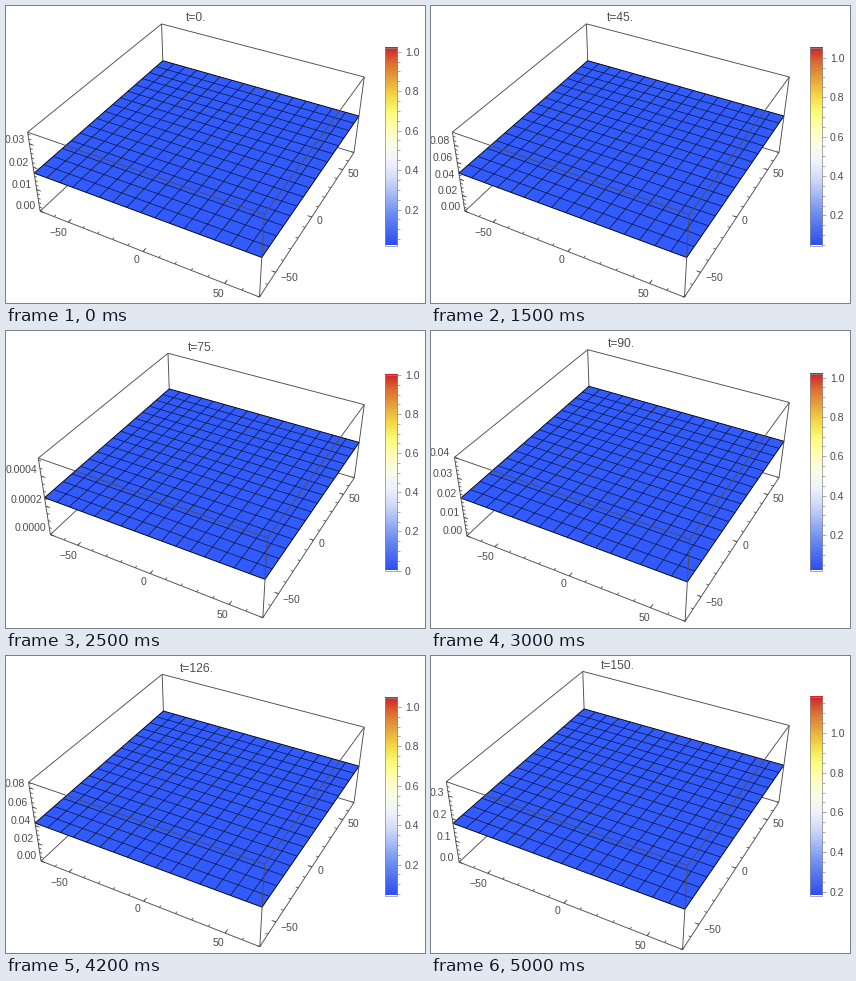
Recreate the animation shown at these times as a matplotlib script. Size 419 by 297 pixels, loop 5.1 s.

```python
import math

import numpy as np
import matplotlib.pyplot as plt
from matplotlib.animation import FuncAnimation
from matplotlib.collections import LineCollection
from matplotlib.colors import LinearSegmentedColormap

W, H, DPI = 419, 297, 100
FRAMES, INTERVAL = 51, 100
PX = 72 / DPI                     # points per pixel
FONT = 10.5                       # label size in pixels
DIGIT, DOT = 0.556 * FONT, 0.278 * FONT
EXTENT = 70                       # x and y run over +-EXTENT
BOX = np.array([0.5, 0.5, 0.2])   # half sizes of the plot box
MID_Y, RIGHT_X = 154.5, 358.3
BAR_X, BAR_END = (379, 391), 239.5

EDGE, INK, BLUE = "#4c4c4c", "#4d4d4d", "#325bff"

TEMPERATURE = LinearSegmentedColormap.from_list("temperature", [
    (0.18, 0.31, 0.93), (0.31, 0.44, 0.94), (0.45, 0.57, 0.95),
    (0.64, 0.72, 0.96), (0.82, 0.86, 0.98), (0.94, 0.95, 0.99),
    (0.98, 0.99, 0.91), (1.00, 0.99, 0.73), (0.99, 0.99, 0.48),
    (0.96, 0.86, 0.28), (0.90, 0.66, 0.24), (0.86, 0.45, 0.20),
    (0.82, 0.13, 0.16)])

# Height of the flat surface over time, interpolated on a log scale.
TIMES = [0, 12, 24, 39, 45, 54, 75, 90, 105, 126, 138, 150]
LEVELS = [0.0174, 0.022, 0.0174, 0.07, 0.0473, 0.006, 0.000257,
          0.02, 0.468, 0.0428, 0.2, 0.18]

# Camera looking at the centre of the box.
EYE = np.array([1.3, -2.4, 2.0])
DIST = np.linalg.norm(EYE)
AHEAD = -EYE / DIST
SIDE = np.cross(AHEAD, [0, 0, 1])
SIDE /= np.linalg.norm(SIDE)
UP = np.cross(SIDE, AHEAD)


def project(p):
    p = np.asarray(p, float)
    depth = DIST + p @ AHEAD
    return np.stack([p @ SIDE / depth, p @ UP / depth], axis=-1)


def corner(x, y, z):
    return BOX * (x, y, z)


TOP_Y = project(corner(-1, 1, 1))[1]
LOW_Y = project(corner(1, -1, -1))[1]
FAR_X = project(corner(1, 1, 1))[0]


def level(t):
    return math.exp(np.interp(t, TIMES, np.log(LEVELS)))


def tick_step(span):
    """Smallest 1-2-5 step giving at most five intervals, and its minor step."""
    power = math.floor(math.log10(span / 5))
    for base, parts in ((1, 5), (2, 4), (5, 5), (10, 5)):
        step = base * 10.0 ** power
        if span / step <= 5:
            return step, step / parts
    return step, step / 5


def make_view(top_tick, label_width):
    """Scale the box so that the leftmost label just fits."""
    left = project([-0.5, -0.5, top_tick * 0.4 - 0.2])[0]
    scale = (RIGHT_X - 3 - label_width) / (FAR_X - left)

    def view(p):
        q = project(p)
        x = RIGHT_X + (q[..., 0] - FAR_X) * scale
        y = MID_Y - (q[..., 1] - (TOP_Y + LOW_Y) / 2) * scale
        return np.stack([x, y], axis=-1)

    return view, scale


fig = plt.figure(figsize=(W / DPI, H / DPI), dpi=DPI, facecolor="white")
ax = fig.add_axes([0, 0, 1, 1])


def lines(segments, color, width, z):
    ax.add_collection(LineCollection(
        segments, colors=color, linewidths=width * PX, zorder=z))


def text(x, y, s, size=FONT, ha="center"):
    ax.text(x, y, s, fontsize=size * PX, family="Liberation Sans",
            color=INK, ha=ha, va="center_baseline", zorder=6)


def text_width(s):
    return sum(DOT if c == "." else DIGIT for c in s)


def axis_ticks(view, point, inward, major, minor, fmt):
    """Ticks point into the box; labels sit on the same ray outside it."""
    segments = []
    for values, size in ((major, 4.5), (minor, 2.6)):
        for v in values:
            p = np.array(point(v))
            start = view(p)
            ray = view(p + 0.02 * np.array(inward)) - start
            ray /= np.linalg.norm(ray)
            segments.append([start, start + ray * size])
            if values is major:
                s = fmt(v)
                reach = 4.6 + text_width(s) / 2 * abs(ray[0]) + 4 * abs(ray[1])
                text(*(start - ray * reach), s)
    lines(segments, EDGE, 0.8, 5)


def draw_box(view):
    def edge(a, b):
        return [view(corner(*a)), view(corner(*b))]

    a, b, c, d = (-1, -1), (1, -1), (1, 1), (-1, 1)
    low = [q + (-1,) for q in (a, b, c, d)]
    high = [q + (1,) for q in (a, b, c, d)]
    behind = [edge(low[0], low[3]), edge(low[3], low[2]), edge(low[3], high[3])]
    front = [edge(low[0], low[1]), edge(low[1], low[2])]
    front += [edge(low[i], high[i]) for i in range(3)]
    front += [edge(high[i], high[(i + 1) % 4]) for i in range(4)]
    lines(behind, EDGE, 0.9, 1)
    lines(front, EDGE, 0.9, 4)


def draw_surface(view):
    rim = view(np.array([[-.5, -.5, 0], [.5, -.5, 0], [.5, .5, 0], [-.5, .5, 0]]))
    ax.fill(rim[:, 0], rim[:, 1], facecolor=BLUE, edgecolor="black",
            linewidth=0.9 * PX, zorder=2)
    mesh = []
    for k in np.linspace(-0.5, 0.5, 17)[1:-1]:
        mesh.append(view(np.array([[k, -.5, 0], [k, .5, 0]])))
        mesh.append(view(np.array([[-.5, k, 0], [.5, k, 0]])))
    lines(mesh, (0.05, 0.06, 0.12, 0.9), 0.75, 3)


def draw_bar(v, top):
    x0, x1 = BAR_X
    ax.imshow(np.linspace(1, 0, 256)[:, None], cmap=TEMPERATURE, vmin=0, vmax=1,
              extent=(x0, x1, BAR_END, top), aspect="auto", zorder=2)
    ax.plot([x0, x1, x1, x0, x0], [top, top, BAR_END, BAR_END, top],
            color="#8a8a8a", lw=0.7 * PX, zorder=3)
    ticks = []
    for k in range(math.ceil(v * 20 - 0.02), math.floor((v + 1) * 20) + 1):
        y = BAR_END - (k / 20 - v) * (BAR_END - top)
        labelled = k % 4 == 0
        ticks.append([(x1, y), (x1 + (4 if labelled else 2.5), y)])
        if labelled:
            text(399, y, f"{k / 20:.1f}" if k else "0", ha="left")
    lines(ticks, "#8a8a8a", 0.7, 4)


def draw(i):
    ax.clear()
    ax.axis("off")
    t = 3 * i
    v = level(t)
    step, sub = tick_step(2 * v)
    decimals = max(0, -math.floor(math.log10(step) + 1e-9))
    count = math.floor(2 * v / step)
    view, scale = make_view(count * step / (2 * v),
                            DIGIT * (decimals + 1) + DOT)

    draw_box(view)
    draw_surface(view)

    def flat(u):
        return f"{u}".replace("-", "\u2212")

    major, minor = [-50, 0, 50], range(-EXTENT, EXTENT + 1, 10)
    unit = 0.5 / EXTENT
    axis_ticks(view, lambda u: (u * unit, -0.5, -0.2), (0, 1, 0),
               major, minor, flat)
    axis_ticks(view, lambda u: (0.5, u * unit, -0.2), (-1, 0, 0),
               major, minor, flat)
    axis_ticks(view, lambda u: (-0.5, -0.5, 0.2 * u / v - 0.2), (1, 0, 0),
               [k * step for k in range(count + 1)],
               [k * sub for k in range(math.floor(2 * v / sub) + 1)],
               lambda u: f"{u:.{decimals}f}")

    left = view(corner(-1, -1, 1))[0]
    top = view(corner(-1, 1, 1))[1]
    text((left + RIGHT_X) / 2, top - 7, f"t={t}.", size=12)
    draw_bar(v, 42.3 - (scale - 810) * 0.06)

    ax.set_xlim(0, W)
    ax.set_ylim(H, 0)
    return []


anim = FuncAnimation(fig, draw, frames=FRAMES, interval=INTERVAL,
                     repeat=True, repeat_delay=0, blit=False)
plt.show()
```
